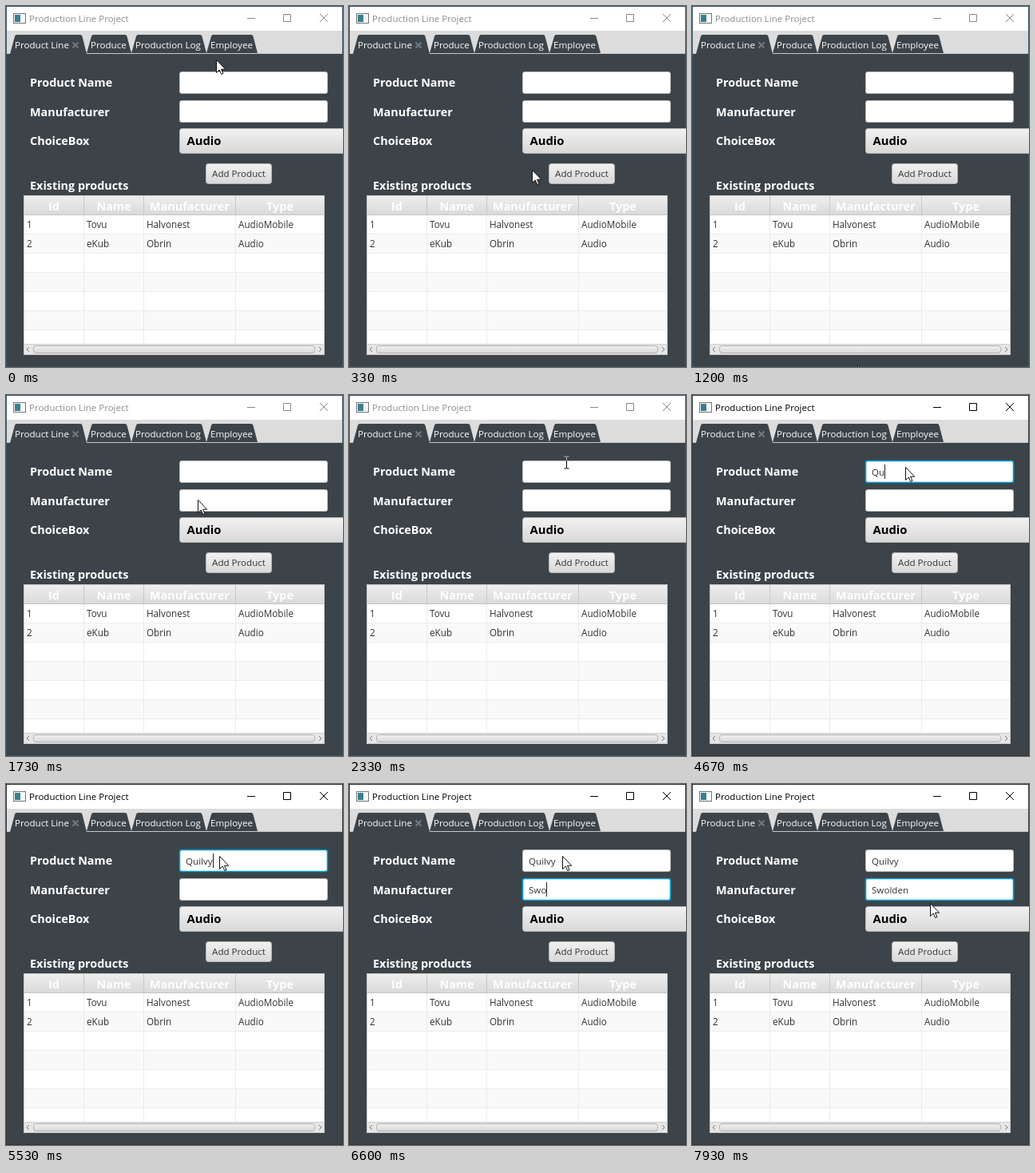
An HTML page for the animation above (8000 ms loop, 422x452 px).

```html
<!DOCTYPE html>
<html lang="en">
<head>
<meta charset="utf-8">
<title>Production Line Project</title>
<style>
  html, body { margin: 0; width: 100%; height: 100%; overflow: hidden; background: #3c4449; }
  svg { display: block; }
  text { font: 11.6px "Open Sans", "Noto Sans", sans-serif; fill: #333; white-space: pre; }
  .w { fill: #fff; }
  .b { font-weight: 700; font-size: 14.4px; }
  .mid { text-anchor: middle; }
  .cell { font-size: 11.7px; }
  .line { fill: none; stroke-width: 1; }
  .field { fill: #fff; stroke: #b9bcbe; }
  .field.focus { stroke: #039ed3; stroke-width: 1.6; }
  #beam { mix-blend-mode: difference; }
</style>
</head>
<body>
<svg id="stage" width="422" height="452" viewBox="0 0 422 452">
  <defs>
    <linearGradient id="btn" x2="0" y2="1">
      <stop stop-color="#f1f1f1"/><stop offset="1" stop-color="#d8d8d8"/>
    </linearGradient>
    <linearGradient id="hover" x2="0" y2="1">
      <stop stop-color="#fbfbfb"/><stop offset="1" stop-color="#e4e4e4"/>
    </linearGradient>
    <linearGradient id="head" x2="0" y2="1">
      <stop stop-color="#eee"/><stop offset="1" stop-color="#d9d9d9"/>
    </linearGradient>
  </defs>

  <!-- window frame and title bar -->
  <rect id="edge" width="422" height="452"/>
  <rect x="1" y="1" width="420" height="450" fill="#3c4449"/>
  <rect x="1" y="1" width="420" height="30" fill="#fff"/>
  <rect x="9.5" y="9.5" width="15" height="12" fill="#f4f8f9" stroke="#777"/>
  <rect x="11" y="11" width="7" height="9" fill="#3a7f8c"/>
  <text id="title" x="29" y="20" style="font-size:11.5px">Production Line Project</text>
  <path id="controls" class="line" d="M302 15.5h10M347.5 10.5h9v9h-9zM393 10l10 10M403 10l-10 10"/>

  <!-- tabs -->
  <rect x="1" y="31" width="420" height="28" fill="#dcdcdc"/>
  <rect x="1" y="59" width="420" height="1" fill="#c6c8c9"/>
  <g id="tabs"></g>
  <path d="M83.5 45.500l7 7M90.500 45.500l-7 7" stroke="#73797c" stroke-width="2"/>

  <!-- form -->
  <text class="w b" x="30" y="101">Product Name</text>
  <text class="w b" x="30" y="138">Manufacturer</text>
  <text class="w b" x="30" y="174">ChoiceBox</text>
  <text class="w b" x="30" y="230">Existing products</text>
  <rect class="field" x="217.5" y="82.500" width="185" height="27" rx="2.5"/>
  <rect class="field" x="217.5" y="118.500" width="185" height="27" rx="2.5"/>
  <text class="typed" x="225" y="101"></text>
  <text class="typed" x="225" y="137"></text>
  <rect id="caret" width="1" height="18" fill="#222"/>
  <rect id="choice" x="217.5" y="153.500" width="215" height="31" rx="3" stroke="#b5b5b5"/>
  <text class="b" x="226.500" y="174" style="fill:#000;font-size:14.8px">Audio</text>
  <rect x="250.500" y="197.500" width="82" height="25" rx="3" fill="url(#btn)" stroke="#b5b5b5"/>
  <text class="mid" x="291.500" y="214">Add Product</text>

  <!-- table -->
  <rect x="22" y="237" width="377" height="200" fill="#c8c8c8"/>
  <rect x="23" y="238" width="375" height="24" fill="url(#head)"/>
  <g id="table"></g>
  <rect x="23" y="423" width="375" height="13" fill="#e6e6e6"/>
  <path class="line" d="M22 423.500h377" stroke="#cfcfcf"/>
  <rect x="34.500" y="425.500" width="352" height="9" rx="3" fill="url(#btn)" stroke="#b0b0b0"/>
  <path class="line" d="M29 427l-3 3 3 3M392 427l3 3-3 3" stroke="#777"/>

  <!-- pointers -->
  <path id="arrow" d="M.5.5V16.500l3.700-3.500 2.600 5.500 2.200-1-2.500-5.300h5.200z" fill="#fff" stroke="#111"/>
  <path id="beam" class="line" stroke="#fff" d="M-3 -7.500h2.500l.5.500.5-.5h2.500M-3 7.500h2.500l.5-.5.5.5h2.500M0 -7v14"/>
</svg>
<script>
const $ = id => document.getElementById(id);
const all = sel => [...document.querySelectorAll(sel)];

// label, left and right foot, text x
$('tabs').innerHTML = [
  ['Product Line', 5, 101, 11], ['Produce', 101, 157, 106],
  ['Production Log', 157, 251, 162], ['Employee', 251, 315, 256]
].map(([label, l, r, x], i) => {
  const foot = i ? 59 : 60;
  return `<path fill="#3c4449" d="M${l} ${foot}L${l + 6} 38q.5-2 2.500-2H${r - 8}q2 0 2.500 2L${r} ${foot}z"/>
    <text class="w" x="${x}" y="53">${label}</text>`;
}).join('');

const columns = [['Id', 23, 97], ['Name', 98, 172], ['Manufacturer', 173, 287], ['Type', 288, 398]];
const rows = [['1', 'Tovu', 'Halvonest', 'AudioMobile'], ['2', 'eKub', 'Obrin', 'Audio']];
let table = '';
for (let i = 0; i < 7; i++) {
  const y = 262 + 24 * i, h = Math.min(24, 423 - y);
  table += `<rect x="23" y="${y}" width="375" height="${h}" fill="${i % 2 ? '#f9f9f9' : '#fff'}"/>`;
  if (h === 24) table += `<rect x="23" y="${y + 23}" width="375" height="1" fill="#ececec"/>`;
}
columns.forEach(([label, l, r], c) => {
  table += `<text class="w b mid" x="${(l + r) / 2}" y="256">${label}</text>`;
  if (c < 3) table += `<rect x="${r}" y="238" width="1" height="24" fill="#c8c8c8"/>
    <rect x="${r}" y="262" width="1" height="161" fill="#ebebeb"/>`;
  rows.forEach((row, i) => {
    table += `<text class="cell" x="${l + 3}" y="${278 + 24 * i}">${row[c]}</text>`;
  });
});
table += '<path class="line" d="M22 261.500h377" stroke="#c4c4c4"/>';
$('table').innerHTML = table;

// time, x, y, pointer shape
const moves = [
  [0, 263, 67, 'arrow'], [70, 258, 78, 'arrow'], [130, 251, 105, 'beam'], [200, 244, 134, 'beam'],
  [270, 237, 168, 'arrow'], [330, 229, 205, 'arrow'], [400, 219, 247, 'arrow'],
  [470, 206, 301, 'arrow'], [530, 191, 360, 'arrow'], [600, 0, 0, ''],
  [1200, 207, 449, 'arrow'], [1270, 210, 394, 'arrow'], [1330, 214, 318, 'arrow'],
  [1400, 224, 236, 'arrow'], [1470, 243, 190, 'arrow'], [1530, 257, 141, 'arrow'],
  [1670, 250, 138, 'arrow'], [1730, 240, 131, 'arrow'], [1800, 233, 122, 'arrow'],
  [1870, 238, 112, 'arrow'], [1930, 248, 103, 'arrow'], [2000, 259, 96, 'arrow'],
  [2070, 266, 91, 'arrow'], [2270, 270.500, 86.500, 'beam'], [2330, 272.500, 84.500, 'beam'],
  [2800, 269, 90, 'arrow'], [2870, 267, 90, 'arrow'],
  [7800, 275, 104, 'arrow'], [7870, 288, 129, 'arrow'], [7930, 298, 149, 'arrow']
];

// time, focused field, its number of letters
const product = 'Quilvy', maker = 'Swolden';
const FOCUS = 2530, NEXT = 5670;
const keys = [
  [0, ''], [3670, maker[0]], [4270, ''],
  ...[4530, 4670, 4730, 4870, 5400, 5530].map((t, i) => [t, product.slice(0, i + 1)])
];
const makerKeys = [
  [0, ''],
  ...[5930, 6130, 6600, 6870, 7000, 7130, 7130].map((t, i) => [t, maker.slice(0, i + 1)])
];
const caretOff = [[0, FOCUS], [3070, 3470], [4130, 4270], [7670, 8000]];

const at = (list, t) => list.findLast(step => step[0] <= t);
const fields = all('.field'), typed = all('.typed');

function draw(t) {
  const active = t >= FOCUS;
  const second = t >= NEXT;
  $('edge').setAttribute('fill', active ? '#30383d' : '#355461');
  $('title').style.fill = active ? '#000' : '#8c8c8c';
  $('controls').setAttribute('stroke', active ? '#000' : '#888');

  typed[0].textContent = at(keys, t)[1];
  typed[1].textContent = at(makerKeys, t)[1];
  fields.forEach((f, i) => f.classList.toggle('focus', active && second === (i === 1)));

  const current = typed[second ? 1 : 0];
  const width = current.textContent ? current.getComputedTextLength() : 0;
  $('caret').setAttribute('x', Math.round(225 + width));
  $('caret').setAttribute('y', second ? 123 : 87);
  $('caret').style.display = caretOff.some(([a, b]) => t >= a && t < b) ? 'none' : '';

  const [, x, y, shape] = at(moves, t);
  for (const id of ['arrow', 'beam']) {
    $(id).style.display = id === shape ? '' : 'none';
    $(id).setAttribute('transform', `translate(${x} ${y})`);
  }
  const over = shape && x >= 217 && y >= 153 && y < 186;
  $('choice').setAttribute('fill', over ? 'url(#hover)' : 'url(#btn)');
}

const start = performance.now();
function tick() {
  draw((performance.now() - start) % 8000);
  requestAnimationFrame(tick);
}
tick();
</script>
</body>
</html>
```
